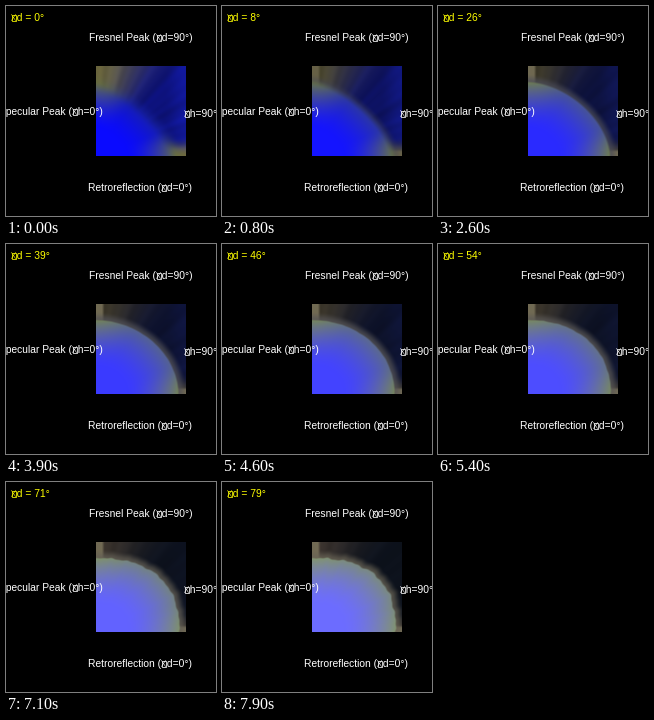
Write a matplotlib script that moves like this. It is 210 by 210 pixels and loops after 8000 ms.

```python
import numpy as np
import matplotlib.pyplot as plt
from matplotlib.animation import FuncAnimation
from matplotlib.patches import Rectangle

SIZE, DPI, FRAMES = 210, 100, 80
FONT_PX = 10.25
LEFT, TOP, SIDE = 90, 60, 90

plt.rcParams["font.family"] = "Liberation Sans"

fig = plt.figure(figsize=(SIZE / DPI, SIZE / DPI), dpi=DPI, facecolor="black")
ax = fig.add_axes([0, 0, 1, 1])
ax.axis("off")


def missing_glyph(x, y, color):
    """Crossed box, standing on the baseline y."""
    w, h = 4, 6
    x, y = round(x) + 0.5, y - 0.5
    ax.add_patch(Rectangle((x, y - h), w, h, fill=False, ec=color, lw=0.55))
    ax.plot([x, x + w], [y - h, y], color=color, lw=0.4)
    ax.plot([x, x + w], [y, y - h], color=color, lw=0.4)


def label(x, y, before, after, color="white"):
    """One line of text with a box in a two-space gap."""
    line = ax.text(x, y, before, color=color, fontsize=FONT_PX * 72 / DPI,
                   ha="left", va="baseline")
    width = 0
    if before:
        width = line.get_window_extent(fig.canvas.get_renderer()).width
    missing_glyph(x + width, y, color)
    line.set_text(before + "  " + after)
    return line


def smooth(x):
    x = np.clip(x, 0, 1)
    return x * x * (3 - 2 * x)


def mix(c0, c1, w):
    c0, c1 = np.asarray(c0, float), np.asarray(c1, float)
    return c0 + (c1 - c0) * np.asarray(w)[..., None]


axis = (np.arange(SIDE) + 0.5) / SIDE
U, V = np.meshgrid(axis, axis[::-1])
ANGLE = np.arctan2(V, U) / (np.pi / 2)
# 1 in the sector facing the upper right corner, 0 next to both axes
DARK = smooth(ANGLE / 0.14) * smooth((1 - ANGLE) / 0.5)
DIAGONAL = smooth(ANGLE / 0.25) * smooth((1 - ANGLE) / 0.4)
STRIP = np.maximum(smooth((0.10 - U) / 0.04), smooth((0.08 - V) / 0.04))


def streaks(phase):
    return (np.sin(31 * ANGLE + phase) + 0.7 * np.sin(53 * ANGLE - 1.7 * phase)
            + 0.5 * np.sin(97 * ANGLE + 2.3)) / 2.2


def slice_image(deg):
    t = deg / (FRAMES - 1)
    early = np.exp(-deg / 8)
    a, b, n = 0.90 + 0.03 * t, 0.82, 1.35 + 1.2 * t
    r = ((U / a) ** n + (V / b) ** n) ** (1 / n)
    r = r + 0.015 * t ** 3 * streaks(2.0)

    # lobe: blue core fading to a rim, green near the axes
    core = [10 + 1.25 * deg, 10 + 1.25 * deg, 255]
    rim = mix(mix([98, 112, 68], [130, 148, 112], t),
              mix(mix([48, 60, 160], [122, 138, 130], t), [24, 34, 165], early),
              DIAGONAL)
    inside = mix(core, rim, np.clip((r - 0.38) / 0.62, 0, 1) ** 1.6)

    # surroundings: olive at the top, dark blue to the right
    olive = mix(mix([64, 61, 36], [62, 54, 48], t), [108, 103, 62], early)
    dark = [13, 18, 22 + 100 * np.exp(-deg / 28)]
    outside = mix(olive, dark, DARK)
    outside = outside + np.array([4, 6, 30]) * (
        smooth((U - 0.75) / 0.25) * DARK * (1 - t))[..., None]
    outside *= 1 + 0.10 * streaks(deg * 0.03)[..., None]
    outside = mix(outside, [122, 115, 90], STRIP * (1 - early) * 0.85)
    halo = smooth(1 - np.maximum(r - 1, 0) / 0.12) * (1 - early)
    outside = mix(outside, mix([62, 66, 90], [105, 100, 86], t), halo * 0.75)

    edge = 0.015 + 0.12 * early
    img = mix(inside, outside, smooth((r - 1 + edge) / (2 * edge)))

    glint = np.exp(-((U - 0.80) ** 2 + (V - 0.36) ** 2) / 0.0003)
    glint *= 0.7 * max(0, 1 - abs(deg - 62) / 5)
    img = mix(img, [225, 225, 225], glint)
    return np.clip(img, 0, 255).astype(np.uint8)


picture = ax.imshow(slice_image(0), interpolation="nearest", aspect="auto",
                    extent=(LEFT, LEFT + SIDE, TOP + SIDE, TOP))
ax.set_xlim(0, SIZE)
ax.set_ylim(SIZE, 0)

label(83, 35, "Fresnel Peak (", "d=90°)")
label(-7, 109, "Specular Peak (", "h=0°)")
label(178, 111, "", "h=90°")
label(82, 185, "Retroreflection (", "d=0°)")
counter = label(5, 15, "", "d = 0°", "yellow")


def update(deg):
    picture.set_data(slice_image(deg))
    counter.set_text(f"  d = {deg}°")
    return picture, counter


anim = FuncAnimation(fig, update, frames=FRAMES, interval=100,
                     repeat=True, repeat_delay=0)
plt.show()
```
